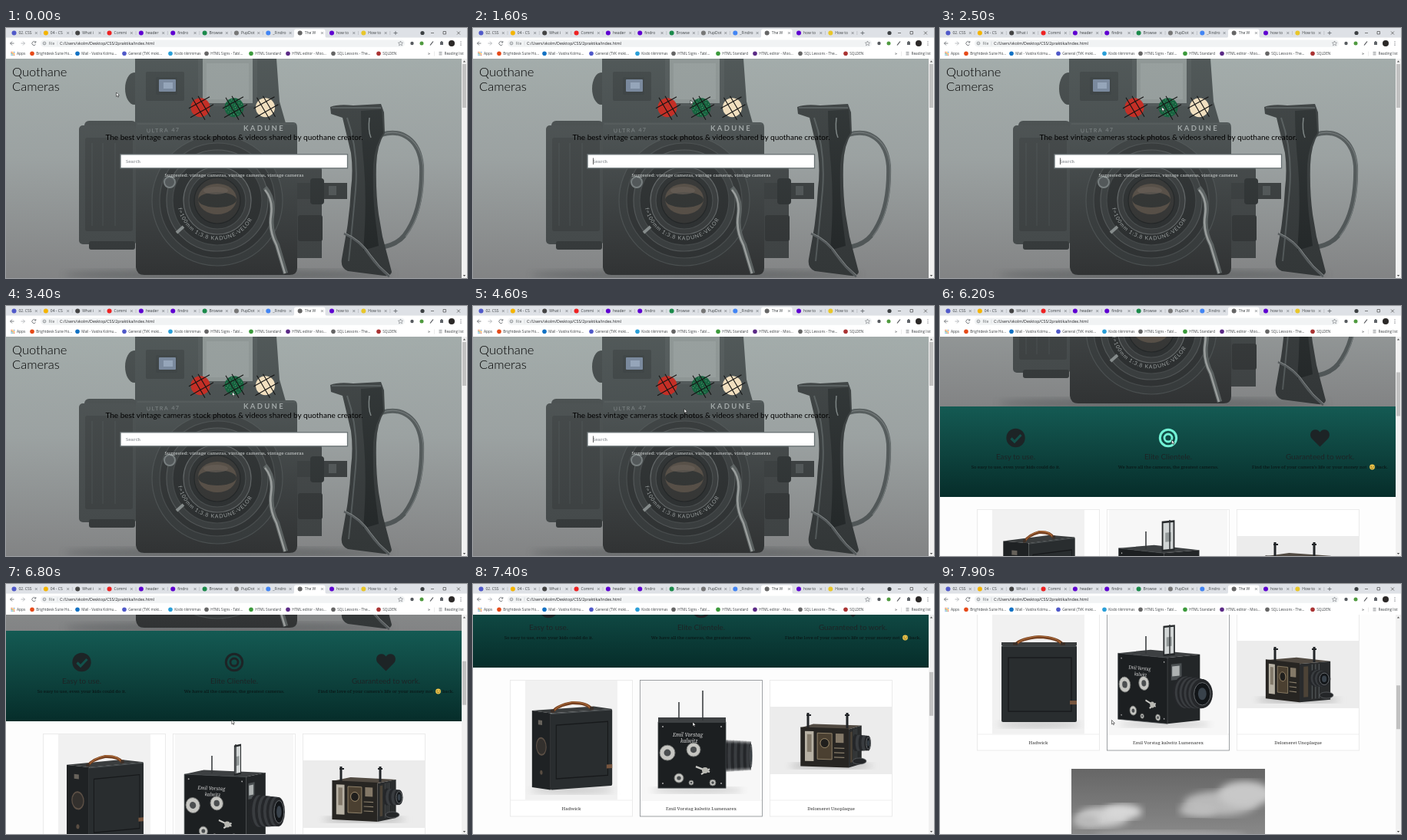
Animation, 600 px wide and 326 px high, one loop 8 s. Source, as an HTML page:

```html
<!DOCTYPE html>
<html lang="en">
<head>
<meta charset="utf-8">
<title>Vintage cameras page</title>
<style>
html, body { margin: 0; width: 100%; height: 100%; overflow: hidden; background: #fff; }
svg { display: block; width: 600px; height: 326px; }
.ui { font-family: "Open Sans", sans-serif; fill: #3c4043; }
.head { font-family: Lato, sans-serif; }
.body { font-family: "Noto Serif", serif; font-size: 5.9px; }
.brand { font-size: 16.5px; font-weight: 300; }
.mid { text-anchor: middle; }
</style>
</head>
<body>
<svg id="stage" viewBox="0 0 600 326"></svg>
<script>
const LOOP = 8000, STEP = 100;
const stage = document.getElementById("stage");

// drawing helpers
const rect = (x, y, w, h, fill, more = "") => `<rect x="${x}" y="${y}" width="${w}" height="${h}" fill="${fill}" ${more}/>`;
const disc = (x, y, r, fill, more = "") => `<circle cx="${x}" cy="${y}" r="${r}" fill="${fill}" ${more}/>`;
const oval = (x, y, rx, ry, fill, more = "") => `<ellipse cx="${x}" cy="${y}" rx="${rx}" ry="${ry}" fill="${fill}" ${more}/>`;
const path = (d, fill, more = "") => `<path d="${d}" fill="${fill}" ${more}/>`;
const line = (d, color, width = 1, more = "") => path(d, "none", `stroke="${color}" stroke-width="${width}" ${more}`);
const text = (x, y, str, cls, more = "") => `<text x="${x}" y="${y}" class="${cls}" ${more}>${str}</text>`;
const gradient = (id, stops) => `<linearGradient id="${id}" x1="0" y1="0" x2="0" y2="1">${
  stops.map(([at, color, alpha = 1]) => `<stop offset="${at}" stop-color="${color}" stop-opacity="${alpha}"/>`).join("")}</linearGradient>`;
const clip = (id, x, y, w, h) => `<clipPath id="${id}">${rect(x, y, w, h, "#000")}</clipPath>`;

const defs = `<defs>
${gradient("wall", [[0, "#a3abaa"], [.45, "#9ca2a2"], [1, "#828384"]])}
${gradient("haze", [[0, "#a3b0ad", .2], [1, "#8a8f8f", .04]])}
${gradient("shell", [[0, "#424849"], [.5, "#363a3b"], [1, "#2d2f30"]])}
${gradient("band", [[0, "#145a53"], [.5, "#0e443f"], [1, "#062d2a"]])}
${gradient("sky", [[0, "#666"], [1, "#a2a2a2"]])}
${clip("view", 0, 40, 593, 286)}${clip("heroBox", 0, 40, 593, 286)}${clip("skyBox", 171, 662, 252, 150)}
<filter id="soft"><feGaussianBlur stdDeviation="5"/></filter>
<filter id="blur"><feGaussianBlur stdDeviation=".6"/></filter>
<path id="rim" d="M224 235A52 52 0 1 0 305 182"/>
</defs>`;

function browser() {
  const tabs = [["02. CSS", "#5059c9"], ["04 - CS", "#f4b400"], ["What i", "#444"], ["Commi", "#e22"],
    ["header", "#5f01d1"], ["findro", "#5f01d1"], ["Browse", "#1b8a4b"], ["PupDot", "#777"],
    ["_Findro", "#4285f4"], ["The W", "#666"], ["how to", "#5f01d1"], ["How to", "#e8c62a"]];
  const marks = [[34, "Brightdesk Suite Ho...", "#e64a19"], [93, "Mail - Vaidra Kolmu...", "#1272c4"],
    [154, "General (TVK moki...", "#5059c9"], [214, "Kodo tikrinimas", "#2a9fd8"], [261, "HTML Signs - Tabl...", "#666"],
    [319, "HTML Standard", "#3c9a3c"], [367, "HTML editor - Moo...", "#5b2a86"],
    [426, "SQL Lessons - The...", "#666"], [485, "SQLDEN", "#a33"]];
  const dark = "#5f6368";
  let out = rect(0, 0, 600, 13, "#dee1e6") + rect(0, 12.5, 600, 27.5, "#fff") +
    path("M373 13Q375 13 375 10V4Q375 1.5 377.5 1.5H413Q415.5 1.5 415.5 4V10Q415.5 13 418 13Z", "#fff");
  tabs.forEach(([name, color], i) => {
    const x = 10.5 + i * 41.35;
    out += disc(x, 6.5, 3, color) + text(x + 6, 8.3, name, "ui", 'font-size="5"') +
      line(`M${x + 27.3} 5l3 3m0-3l-3 3`, dark, .6);
    if (i !== 8 && i !== 9) out += line(`M${x + 34.5} 4v5`, "#9a9da2", .4);
  });
  out += line("M504.5 6.5h5m-2.5-2.5v5", dark, .8) + disc(542, 6.5, 2.6, "#3c4043") +
    line("M553 6.5h4M569 4.5h3.5v3.5h-3.5zM587 4.5l4 4m0-4l-4 4", "#333", .6);
  out += line("M10.5 20h-5m2.5-2.5l-2.5 2.5l2.5 2.5", dark, .8) +
    line("M19.5 20h5m-2.5-2.5l2.5 2.5l-2.5 2.5", "#a9acb0", .8) +
    line("M38.4 18.6a2.5 2.5 0 1 0 .2 2.6M38.8 17v2h-2", dark, .8) +
    rect(45, 15.5, 474, 9.2, "#f1f3f4", 'rx="4.6"') +
    disc(50, 20, 1.9, "none", `stroke="${dark}" stroke-width=".6"`) + line("M50 19.5v1.6", dark, .5) +
    text(55.5, 21.9, "File", "ui", 'font-size="5" opacity=".75"') + line("M67 17.5v5", "#b8bbc0", .4) +
    text(70, 21.9, "C:/Users/vkolm/Desktop/CSS/2praktika/index.html", "ui", 'font-size="5.25" style="fill:#202124"') +
    path("M513.5 17l.9 2l2.2.2l-1.7 1.4l.6 2.2l-2-1.2l-2 1.2l.6-2.2l-1.7-1.4l2.2-.2z", "none", `stroke="${dark}" stroke-width=".5"`) +
    disc(528.5, 20, 2.2, "#565a5f") + disc(541, 20, 2.5, "#4f9a3f") + line("M552 22.5l4-5", "#4a4d52", 1.2) +
    rect(565, 18, 4, 4, dark, 'rx=".6"') + disc(567, 18, 1.1, dark) +
    disc(580, 20, 4, "#2b2827") + [17.8, 20, 22.2].map(y => disc(592, y, .6, dark)).join("");
  for (let i = 0; i < 9; i++) {
    out += rect(6.5 + i % 3 * 1.8, 31 + (i / 3 | 0) * 1.8, 1.2, 1.2, ["#ea4335", "#fbbc04", "#4285f4", "#34a853"][i % 4]);
  }
  out += text(14, 35.1, "Apps", "ui", 'font-size="4.9"');
  marks.forEach(([x, name, color]) => {
    out += disc(x, 33.2, 2.8, color) + text(x + 5.2, 35.1, name, "ui", 'font-size="4.7"');
  });
  return out + text(549, 35, "»", "ui", 'font-size="6"') + line("M557.5 30.5v6", "#ccc", .4) +
    line("M563.5 31.5h4m-4 1.7h4m-4 1.7h4", dark, .6) + text(570.5, 35.1, "Reading list", "ui", 'font-size="4.7"');
}

function heroCamera() {
  const rings = [[85, "#323637", "#474c4d"], [75, "#2a2d2e", "#434748"], [66, "#343839", "#4d5152"],
    [58, "#252829", "#3f4344"], [44, "#323536", "#5d6162"], [37, "#26292a", "#434748"], [30, "#2e2e2d", "#1a1d1e"]];
  let out = rect(0, 40, 593, 286, "url(#wall)") +
    oval(290, 322, 215, 7, "#55585a", 'filter="url(#soft)" opacity=".6"');
  // film back and right side
  out += rect(102, 121, 68, 20, "#3e4344", 'rx="6"') + rect(95, 127, 75, 155, "#404546", 'rx="5"') +
    rect(108, 278, 60, 11, "#303435", 'rx="3"') + rect(103, 143, 62, 122, "#373b3c", 'rx="3"') +
    line("M112 150v108M126 150v108M142 150v108", "#454a4b", 1) +
    path("M376 172H398Q411 174 411 186V300H376Z", "#3a3e3f") + rect(380, 244, 32, 34, "#2d3031", 'rx="3"') +
    rect(378, 202, 66, 21, "#323637") + rect(396, 196, 18, 34, "#272b2c", 'rx="4"') + rect(420, 206, 10, 12, "#4b5051") +
    // grip and strap
    line("M489 139C515 131 538 145 541 180C542 215 536 248 518 271Q508 283 488 286", "#4c5253", 6) +
    line("M491 138C516 131 540 146 543 181C544 216 538 249 520 272", "#6d7374", 1.2) +
    path("M422 103Q432 99 452 101L488 99L492 110L493 137Q483 152 482 178Q481 214 485 243L490 272L502 318Q501 324 492 323L445 317Q435 313 437 301L444 261Q448 234 449 209Q452 186 449 163L438 117L423 112Z", "#2f3334") +
    path("M462 108L489 106L491 137Q480 152 478 178Q477 214 480 243L485 284L465 290Q470 230 466 180Q462 140 462 108Z", "#1e2223") +
    line("M444 117Q459 160 455 211Q450 265 446 304", "#4f5556", 2) + line("M424 104H488", "#555b5c", 1.5) +
    line("M473 117Q471 134 475 143", "#798080", 1.5);
  // top housing and main body
  out += oval(167, 79, 12, 21, "#363b3c") + path("M168 40H352L356 96L364 124H168Z", "#3d4344") +
    rect(182, 57, 50, 38, "#303536", 'rx="2"') + rect(195, 64, 28, 23, "#2b3032", 'rx="2"') +
    rect(199, 67, 22, 16, "#72829b", 'rx="1" filter="url(#blur)"') + rect(205, 71, 12, 8, "#93a4bd", 'filter="url(#blur)"') +
    rect(250, 40, 77, 62, "#454b4c") + rect(256, 40, 65, 58, "#8b9291") + rect(261, 46, 55, 47, "#959c9b") +
    path("M169 123H374Q379 123 379 130V313Q379 322 369 322H180Q170 322 169 312Z", "url(#shell)") +
    line("M171 125H376M172 145H376", "#505657", 1) +
    text(183, 136.5, "ULTRA 47", "head", 'font-size="7" letter-spacing="1.6" fill="#7f8687" transform="rotate(-2 184 137)"') +
    text(309, 134, "KADUNE", "head", 'font-size="9.5" font-weight="700" letter-spacing="2.3" fill="#a3a9a9"');
  // lens
  rings.forEach(([r, fill, edge]) => out += disc(275, 225, r, fill, `stroke="${edge}" stroke-width="1.2"`));
  out += `<text class="head" font-size="7" letter-spacing=".9" fill="#9ca1a1"><textPath href="#rim">f=100mm   1:3.8    KADUNE-VELOR</textPath></text>` +
    oval(275, 223, 25, 20, "#51483f") + oval(275, 224, 25, 10, "#2a2c2b") + oval(273, 212, 16, 5, "#625850", 'opacity=".7"') +
    disc(213, 201, 7, "#4b5052", 'stroke="#757c7d" stroke-width="2"') + line("M222 267l9-8", "#858b8b", 4);
  // release cable
  return out + line("M337 208Q349 222 346 244Q343 264 353 283L364 320", "#585e5e", 6.5) +
    line("M337 211Q348 224 345 244Q342 264 352 283L363 320", "#9b9f9e", 2.5) +
    line("M440 268Q462 278 473 296Q484 312 499 324", "#53585a", 3) +
    line("M441 267Q463 277 474 295Q485 311 500 323", "#858a8a", 1) +
    rect(0, 40, 593, 286, "url(#haze)");
}

function hashBall(x, color, dotted) {
  let out = disc(0, 0, 12.5, color);
  for (let i = 0; dotted && i < 34; i++) {
    const r = 11.6 * Math.sqrt((i + .5) / 34), a = i * 2.4;
    out += disc((r * Math.cos(a)).toFixed(1), (r * Math.sin(a)).toFixed(1), .45, "#b5d5b5");
  }
  return `<g transform="translate(${x} 103.7)">${out}${
    line("M-15 1L12-14M-13 13L17-4M-11-13L6 16M-3-15L13 12", "#141414", 1.1)}</g>`;
}

const hero = () => `<g clip-path="url(#heroBox)">${heroCamera()}</g>` +
  text(8, 63.3, "Quothane", "head brand") + text(8, 81.8, "Cameras", "head brand") +
  hashBall(253, "#c42f26") + hashBall(297, "#17633f", true) + hashBall(337.5, "#f1dfbf") +
  text(297, 146.3, "The best vintage cameras stock photos &amp; videos shared by quothane creator.", "head mid", 'font-size="10"') +
  rect(149, 164.8, 295.5, 18, "#fff", 'stroke="#687173" stroke-width="1.3"') +
  text(156, 176, "Search", "body", 'fill="#757b80"') +
  `<path id="caret" d="M156.5 169.5v8.5" stroke="#222" stroke-width=".7"/>` +
  text(297, 194.3, "Suggested: vintage cameras, vintage cameras, vintage cameras", "body mid", 'fill="#d5d9d8" style="font-size:6.1px"');

function features() {
  const ink = "#1d2426";
  const label = (x, title, note) => text(x, 395, title, "head mid", `font-size="9.9" fill="${ink}"`) +
    (note ? text(x, 407, note, "body mid", 'fill="#0a1112"') : "");
  return rect(0, 326, 593, 118, "url(#band)") +
    disc(98.5, 367, 12.2, ink) + line("M92.5 367.5l4.5 4.5l8.5-9", "#12514b", 3.2) +
    `<g id="target">${disc(297, 367, 10.7, "none", 'stroke-width="3"')}${disc(297, 367, 5, "none", 'stroke-width="2.8"')}</g>` +
    path("M494.5 378.5L484 368C480.5 364 482 358 486.5 356.5Q491.5 355 494.5 359.5Q497.5 355 502.5 356.5C507 358 508.5 364 505 368Z", ink) +
    label(98.5, "Easy to use.", "So easy to use, even your kids could do it.") +
    label(297, "Elite Clientele.", "We have all the cameras, the greatest cameras.") + label(494.5, "Guaranteed to work.") +
    text(406, 407, "Find the love of your camera's life or your money not", "body", 'fill="#0a1112"') +
    text(568, 407, "back.", "body", 'fill="#0a1112"') + disc(562.5, 405, 3.4, "#f2c84b") +
    disc(561.2, 404.2, .6, "#493c18") + line("M563.3 404.2h1.5M560.7 406q1.8 1.6 3.6 0", "#493c18", .6);
}

const card = (x, name) => rect(x, 460.5, 159, 177.5, "#fff", 'class="card" stroke-width=".8"') +
  line(`M${x + .5} 617h158`, "#e9e9e9", .7) + text(x + 79.5, 629.5, name, "body mid", 'fill="#333"');

const clouds = () => {
  const puff = (x, y, rx, ry, tone) => oval(x, y, rx, ry, tone, 'filter="url(#soft)"');
  return `<g clip-path="url(#skyBox)">${rect(171, 662, 252, 150, "url(#sky)")}${
    puff(212, 725, 34, 13, "#cfcfcf")}${puff(238, 718, 25, 10, "#d8d8d8")}${puff(190, 730, 17, 9, "#b9b9b9")}${
    puff(365, 707, 48, 16, "#b9b9b9")}${puff(397, 695, 35, 17, "#c8c8c8")}${puff(335, 716, 24, 8, "#bdbdbd")}${
    puff(300, 750, 100, 7, "#a9a9a9")}</g>`;
};

// turning boxes: every face is an affine plane at a given yaw
const TILT = .1;
const spin = (cx, cy, yaw) => {
  const rad = deg => deg * Math.PI / 180;
  const at = (turn, r) => { const a = rad(yaw + turn); return [cx + r * Math.sin(a), cy + TILT * r * Math.cos(a)]; };
  const face = (turn, r, art) => {
    const a = rad(yaw + turn), [x, y] = at(turn, r);
    return Math.cos(a) > .02 ? `<g transform="matrix(${Math.cos(a)} ${-TILT * Math.sin(a)} 0 1 ${x} ${y})">${art}</g>` : "";
  };
  const top = (w, d, h, fill) => {
    const a = rad(yaw), pts = [[-1, -1], [1, -1], [1, 1], [-1, 1]].map(([i, j]) => {
      const u = i * w / 2, z = j * d / 2;
      return `${cx + u * Math.cos(a) + z * Math.sin(a)},${cy - h / 2 + TILT * (z * Math.cos(a) - u * Math.sin(a))}`;
    });
    return `<polygon points="${pts.join(" ")}" fill="${fill}"/>`;
  };
  const barrel = (turn, from, len, r, dy) => {
    const c = Math.cos(rad(yaw + turn)), rx = Math.max(1.5, r * Math.abs(c));
    let out = "";
    for (let s = 0; s <= len; s += 2) {
      const [x, y] = at(turn, from + s);
      out += oval(x, y + dy, rx, r - s * .06, s % 8 < 4 ? "#25272a" : "#3a3d40");
    }
    const [x, y] = at(turn, from + len);
    return out + oval(x, y + dy, rx * .75, r * .7, "#121518", 'stroke="#666a6d" stroke-width="1"') + oval(x, y + dy, rx * .38, r * .38, "#39424b");
  };
  return { face, top, barrel };
};

function boxCamera(yaw) {
  const s = spin(129, 549, yaw), leather = rect(-49, -50, 98, 100, "#292d2f", 'rx="2"');
  return oval(129, 604, 54, 5, "#c9c9c9", 'filter="url(#soft)"') + s.top(98, 42, 100, "#3a3d3e") +
    s.face(-90, 49, rect(-21, -50, 42, 100, "#1f2224") + disc(0, -5, 11, "#33302d", 'stroke="#5b4f45" stroke-width="2"') +
      rect(-7, -39, 9, 6, "#67625b") + disc(0, 29, 3, "#594d42")) +
    s.face(0, 21, leather + rect(-40, -34, 82, 70, "none", 'stroke="#17191b" stroke-width="1.3"') +
      rect(40, 22, 9, 5, "#77553e") + line("M-48-49H48", "#555a5c", 1)) +
    s.face(0, 0, line("M-31-49Q-24-57 0-59Q24-58 31-49", "#754020", 4) + line("M-28-51Q-21-58 0-60Q23-59 29-50", "#b2703c", 1.2) +
      rect(-34, -52, 6, 4, "#3b3029") + rect(28, -52, 6, 4, "#3b3029"));
}

function cubeCamera(yaw) {
  const s = spin(285, 555, yaw), knob = (x, y, r) => disc(x, y, r, "#c6c6c2", 'stroke="#707270" stroke-width="1"') + disc(x, y, r * .45, "#4b4e50");
  const script = 'font-size="6.5" font-style="italic" font-family="Noto Serif, serif" fill="#ddd"';
  return oval(292, 604, 60, 4, "#c8c8c8", 'filter="url(#soft)"') + s.top(88, 62, 86, "#3d4042") +
    s.face(-90, 6, rect(-3, -76, 6, 34, "#25282a") + disc(0, -72, 5, "#ddd", 'stroke="#303335" stroke-width="1.5"')) +
    s.face(90, 18, rect(-10, -80, 20, 37, "#d1d5d5", 'stroke="#25282a" stroke-width="2.5"') + rect(-5, -66, 10, 12, "#929898")) +
    line("M268 512v-23M299 513v-39", "#333638", 1.5) +
    s.face(90, 44, rect(-31, -43, 62, 86, "#232628") + rect(-24, -34, 20, 21, "#4b5052") + rect(-22, -31, 14, 13, "#aeb2b2")) +
    s.barrel(90, 44, 33, 21, 4) +
    s.face(0, 31, rect(-44, -43, 88, 86, "#1c1f21", 'stroke="#43484a" stroke-width=".8"') +
      text(-25, -24, "Emil Vorstag", "", script) + text(-15, -16, "kalwitz", "", script) +
      knob(-32, -3, 10) + knob(2, -7, 9) + knob(-17, 30, 6) + knob(27, 36, 4) + knob(-1, 36, 3) +
      line("M5 15l18 7M12 25l11-7", "#c9c9c5", 2.2) + disc(17, 20, 4, "#b8b8b2") +
      [-38, 38].map(x => disc(x, -37, 1, "#aaa") + disc(x, 37, 1, "#aaa")).join(""));
}

function plateCamera(yaw) {
  const s = spin(466, 545, yaw);
  return oval(466, 572, 54, 4, "#aeaeae", 'filter="url(#soft)"') + s.top(66, 54, 48, "#514a42") +
    line("M436 532v-29M487 523v-20", "#222528", 3) + line("M434 506h6M484 506h6", "#222528", 2) +
    s.face(90, 33, rect(-27, -24, 54, 50, "#292b2c") + rect(-20, -20, 8, 40, "#4c4337") + line("M-5-22v45M1-22v45M7-22v45", "#555a5c", 1.5)) +
    s.barrel(90, 33, 18, 11, -4) +
    s.face(0, 27, rect(-33, -25, 66, 51, "#272522") + rect(-27, -20, 12, 39, "#b7b1a4") + rect(-24, -16, 6, 23, "#837a6b") +
      rect(-10, -18, 20, 34, "#4b4031", 'stroke="#92846c" stroke-width="1"') + disc(0, -5, 6, "#201f1d", 'stroke="#a18e6e" stroke-width="1"') +
      rect(15, -18, 11, 12, "#847968") + line("M13 1h14M13 7h14M13 13h14", "#897e6b", 1.2)) +
    oval(503, 566, 9, 4, "#242628", 'stroke="#65686a" stroke-width=".7"');
}

const cursorShape = path("M0 0V7.2L1.7 5.7L2.9 8.3L4.1 7.8L2.9 5.2H5.2Z", "#fff", 'stroke="#111" stroke-width=".7" transform="scale(.75)"');

stage.innerHTML = defs + rect(0, 0, 600, 326, "#fff") +
  `<g clip-path="url(#view)"><g id="page">${rect(0, 326, 593, 500, "#fdfdfd")}${hero()}${features()}${
    card(48.5, "Hadwick")}${card(217.5, "Emil Vorstag kalwitz Lumenarex")}${card(386.5, "Delomeret Unoplaque")}${
    rect(68, 461, 120, 155.5, "#f1f1f1")}${rect(220, 461, 154, 155.5, "#f7f7f7")}${rect(387, 495, 158, 88, "#ececec")}
    <g id="cameras"></g>${clouds()}</g></g>` + browser() +
  rect(593, 40, 7, 286, "#f1f1f1") + `<rect id="thumb" x="594" width="5" height="57" fill="#c1c1c1"/>` +
  path("M594.8 44.5l1.7-2l1.7 2zM594.8 322l1.7 2l1.7-2z", "#505050") +
  `<g id="cursor">${cursorShape}</g>`;

const el = Object.fromEntries(["page", "caret", "target", "cameras", "thumb", "cursor"].map(id => [id, document.getElementById(id)]));
const cards = [...document.querySelectorAll(".card")];

// keys are [time, value]
const track = (keys, smooth) => t => {
  const next = keys.findIndex(k => k[0] > t);
  if (next < 0) return keys[keys.length - 1][1];
  if (next === 0) return keys[0][1];
  const [t0, a] = keys[next - 1], [t1, b] = keys[next];
  let k = (t - t0) / (t1 - t0);
  if (smooth) k = k * k * (3 - 2 * k);
  return a + (b - a) * k;
};
const scrollAt = track([[5000, 0], [5400, 60], [6100, 195], [6300, 195], [7300, 335], [7400, 335], [7900, 421]]);
const cursorX = track([[0, 143.5], [1600, 283], [3400, 294.5], [4300, 285], [5400, 230], [6200, 301.5], [7400, 286], [7900, 223.5]], true);
const cursorY = track([[0, 84], [1600, 94], [3400, 112], [5400, 146], [6200, 174.5], [7400, 180], [7900, 177.5]], true);
const boxYaw = track([[6200, 52], [7400, 35], [7900, 0]]);
const cubeYaw = track([[6200, -48], [7400, 0], [7900, -43]]);
const plateYaw = track([[6200, -35], [7400, -18], [7900, -48]]);

function draw(t) {
  const scroll = scrollAt(t), x = cursorX(t), y = cursorY(t);
  const pageY = y + scroll;
  el.page.setAttribute("transform", `translate(0 ${-scroll})`);
  el.thumb.setAttribute("y", 47 + scroll * .2025);
  el.cursor.setAttribute("transform", `translate(${x} ${y})`);
  el.caret.setAttribute("opacity", Math.floor(t / 500) % 2);
  el.target.setAttribute("stroke", Math.hypot(x - 297, pageY - 367) < 13 ? "#72f3d5" : "#1d2426");
  cards.forEach(c => {
    const left = +c.getAttribute("x");
    const over = x > left && x < left + 159 && pageY > 460 && pageY < 638;
    c.setAttribute("stroke", over ? "#85898d" : "#e6e6e6");
  });
  el.cameras.innerHTML = scroll > 130 ? boxCamera(boxYaw(t)) + cubeCamera(cubeYaw(t)) + plateCamera(plateYaw(t)) : "";
}

let shown = -1;
function tick() {
  const t = Math.floor(performance.now() % LOOP / STEP) * STEP;
  if (t !== shown) draw(shown = t);
  requestAnimationFrame(tick);
}
tick();
</script>
</body>
</html>
```
